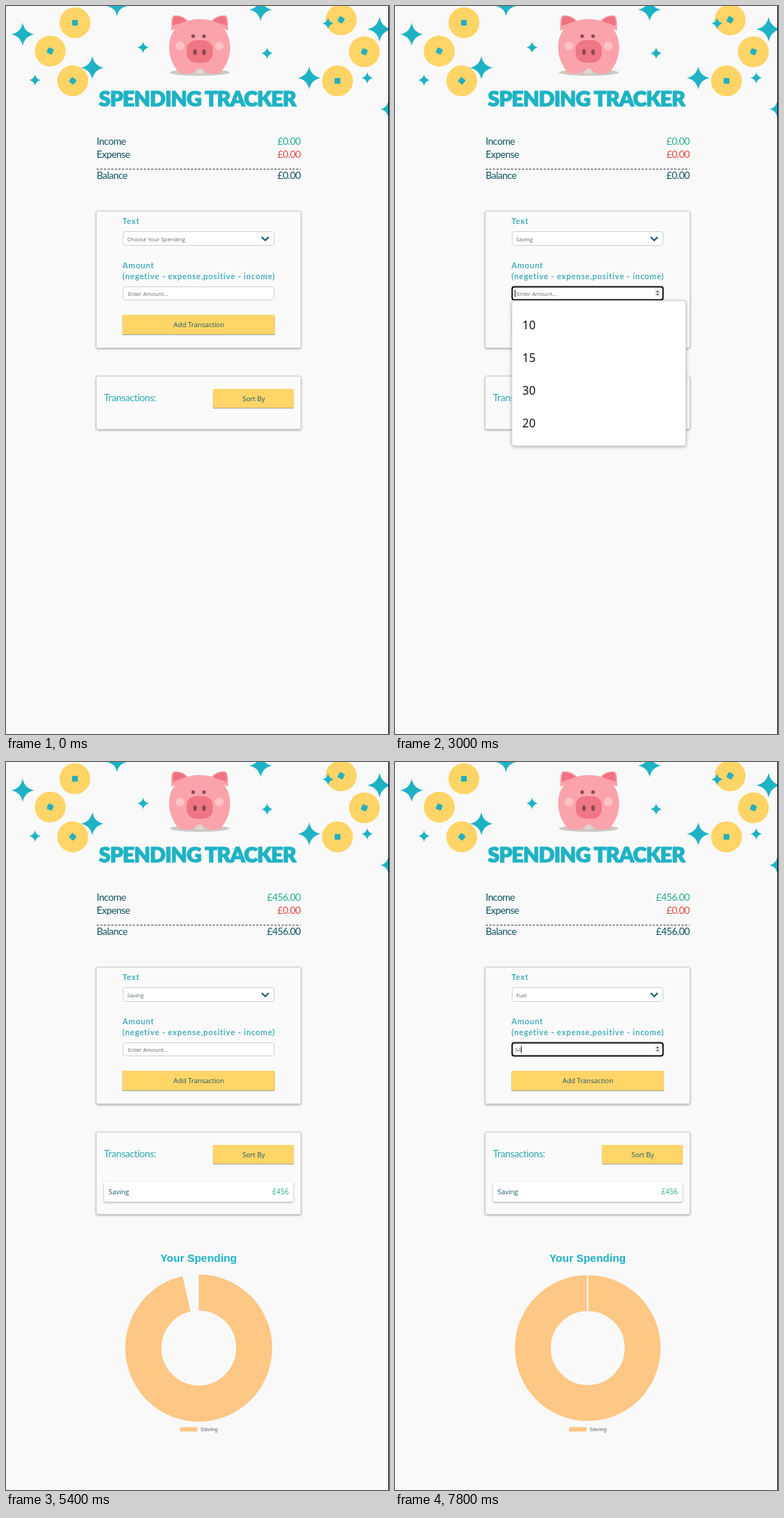
Write an HTML page that moves like this. It is 528x1002 px and loops after 8 s.

```html
<!DOCTYPE html>
<html lang="en">
<head>
<meta charset="utf-8">
<title>Spending Tracker</title>
<style>
  html, body { margin: 0; width: 100%; height: 100%; overflow: hidden; background: #f9f9f9; }
  svg { display: block; }
  text { white-space: pre; }
  .row { font: 13.5px Lato, sans-serif; letter-spacing: -.55px; fill: #0f5260; }
  .label { font: bold 11px Lato, sans-serif; letter-spacing: .7px; fill: #46adba; }
  .small { font: 7.6px "Open Sans", sans-serif; fill: #5c6b72; }
  .button { font: 9.3px "Open Sans", sans-serif; fill: #17586a; }
  .number { font: 16px "Noto Sans", sans-serif; fill: #111; }
  .end { text-anchor: end; }
  .mid { text-anchor: middle; }
  .card { fill: #fafafa; stroke: #d2d2d2; filter: drop-shadow(0 1.5px 1.5px rgba(0,0,0,.34)); }
  .gold { fill: #ffd567; filter: drop-shadow(0 1px .6px rgba(0,0,0,.35)); }
  .field { fill: #fff; stroke: #d0d0d0; }
  .popup { fill: #fff; stroke: #d0d0d0; filter: drop-shadow(0 1px 2px rgba(0,0,0,.3)); }
  .menu { fill: #fff; stroke: #5a5a5a; filter: drop-shadow(0 1px 3px rgba(0,0,0,.32)); }
</style>
</head>
<body>
<svg width="528" height="1002" viewBox="0 0 528 1002">
  <rect width="528" height="1002" fill="#f9f9f9"/>
  <g id="decor"></g>

  <g id="pig">
    <ellipse cx="267" cy="91.5" rx="41" ry="4.5" fill="#cdc8c4"/>
    <path d="M228 34Q227 13 232 13Q245 12 252 22ZM306 34Q307 13 302 13Q289 12 282 22Z" fill="#f9a0a8"/>
    <path d="M230 27Q229 14 234 14Q243 14 249 21ZM304 27Q305 14 300 14Q291 14 285 21Z" fill="#ef7481"/>
    <path d="M267 18C291 18 309 31 309 57C309 73 303 82 297 90Q295 93 289 93H281Q276 93 273 89H261Q258 93 253 93H245Q239 93 237 90C231 82 225 73 225 57C225 31 243 18 267 18Z" fill="#fba3ab"/>
    <path d="M261 93Q262 86 267 86Q272 86 273 93Z" fill="#ddd5d1"/>
    <circle cx="240" cy="55" r="6" fill="#fdc3c5"/>
    <circle cx="294" cy="55" r="6" fill="#fdc3c5"/>
    <rect x="249" y="47" width="36" height="31" rx="13" fill="#ef7783"/>
    <g fill="#8a4b4f">
      <circle cx="258" cy="41.5" r="2.5"/>
      <circle cx="273" cy="41.5" r="2.5"/>
      <ellipse cx="260.5" cy="63.5" rx="2.5" ry="4"/>
      <ellipse cx="273" cy="63.5" rx="2.5" ry="4"/>
    </g>
  </g>
  <text x="128" y="137.5" fill="#1eb2c5" stroke="#1eb2c5" stroke-width="1.1" stroke-linejoin="round"
    style="font:900 29px Lato,sans-serif;letter-spacing:-.9px">SPENDING TRACKER</text>
  <path d="M527.5 0V1002" stroke="#111"/>

  <g class="row">
    <text x="125" y="191">Income</text>
    <text x="125" y="209">Expense</text>
    <text x="125" y="238">Balance</text>
    <text id="income" class="end" x="406" y="191" style="fill:#27ae8c"></text>
    <text class="end" x="406" y="209" style="fill:#e0483f">£0.00</text>
    <text id="balance" class="end" x="406" y="238"></text>
  </g>
  <path d="M125 224.5H406" stroke="#444" stroke-dasharray="3 2"/>

  <rect class="card" x="124.5" y="282.5" width="282" height="188" rx="2"/>
  <g class="label">
    <text x="160.5" y="300">Text</text>
    <text x="160.5" y="361">Amount</text>
    <text x="160.5" y="376">(negetive - expense,positive - income)</text>
  </g>
  <rect id="select" class="field" x="161.5" y="310.5" width="208" height="19" rx="3"/>
  <text id="choice" class="small" x="167" y="324"></text>
  <path d="M352.5 318l4.8 4.6 4.8-4.6" fill="none" stroke="#0e5868" stroke-width="2"/>
  <rect id="input" x="161.5" y="386.5" width="208" height="18" rx="3" fill="#fff"/>
  <text id="amount" class="small" y="399"></text>
  <path id="caret" stroke="#111"/>
  <g id="spinner">
    <rect x="358" y="390" width="8" height="10" fill="#eee"/>
    <path d="M360 394l2-2.4 2 2.4zM360 396.200l2 2.4 2-2.4z" fill="#444"/>
  </g>
  <rect class="gold" x="160.500" y="425" width="210" height="27" rx="1"/>
  <text class="button mid" x="266" y="442">Add Transaction</text>

  <rect id="list" class="card" x="124.5" y="509.5" width="282" rx="2"/>
  <text class="row" x="135" y="543.5" style="fill:#2fa8b5;letter-spacing:-.4px">Transactions:</text>
  <rect class="gold" x="285.5" y="527" width="111" height="26" rx="1"/>
  <text class="button mid" x="341.5" y="544">Sort By</text>

  <g id="result">
    <rect x="135" y="577.5" width="261" height="28" rx="3" fill="#fff"
      style="filter:drop-shadow(0 1px 1px rgba(0,0,0,.36))"/>
    <text class="button" x="141.5" y="595">Saving</text>
    <text class="button end" x="390" y="595" style="fill:#27ae8c;font-size:10px">£456</text>
    <text class="mid" x="265.5" y="688" fill="#1eb2c5"
      style="font:bold 15px 'Liberation Sans',Arial,sans-serif">Your Spending</text>
    <circle id="ring" cx="265.7" cy="806.6" pathLength="360" fill="none" stroke="#fdc785"
      transform="rotate(-90 265.7 806.6)"/>
    <path id="seam" d="M265.5 706V756" stroke="#fff" stroke-width="1.8"/>
    <rect x="240" y="915.5" width="24" height="6" fill="#fdc785"/>
    <text x="268" y="921" fill="#666" style="font:7.85px 'Liberation Sans',Arial,sans-serif">Saving</text>
  </g>

  <g id="menu"></g>
  <g id="suggest">
    <rect id="suggestBox" class="popup" x="161" y="405.5" width="240" rx="4"/>
    <g id="suggestItems" class="number"></g>
  </g>
</svg>

<script>
const LOOP = 8000, STEP = 100;
const ADDED = 4900, CHART_START = 4834, CHART_TIME = 1000;
const OPTIONS = ['Choose Your Spending', 'Salary', 'Carry Over', 'Deposits', 'Saving', 'Eating Out',
  'Gifts', 'Clothes', 'Entertainment', 'Fuel', 'Holidays', 'Kids', 'Shopping', 'Sports', 'Travel',
  'Car', 'Health', 'House', 'Others'];
const HISTORY = ['10', '15', '30', '20'];

const el = id => document.getElementById(id);
const show = (id, on) => el(id).setAttribute('visibility', on ? 'inherit' : 'hidden');
const set = (id, attrs) => Object.entries(attrs).forEach(([k, v]) => el(id).setAttribute(k, v));
const during = (t, ...spans) => spans.some(([from, to]) => t >= from && t < to);
// Latest value whose start time has passed.
const latest = (t, keys) => keys.filter(([start]) => t >= start).pop()[1];

function drawDecor() {
  const coins = [[95, 23, 0], [61, 62, 22], [92, 103, 38], [462, 19, 30], [494, 63, 22], [457, 103, 0]];
  const stars = [[23, 39, 16], [119, 85, 16], [153, 0, 14], [189, 57, 8], [40, 102, 8], [351, 5, 16],
    [360, 65, 8], [444, 24, 8], [418, 99, 16], [498, 99, 8], [515, 32, 17], [527, 142, 11]];
  const coin = ([x, y, turn]) => `<g transform="translate(${x} ${y}) rotate(${turn})">
    <circle r="21.3" fill="#ffd467"/><rect x="-4" y="-4" width="8" height="8" rx="1.5" fill="#22b0c0"/></g>`;
  const star = ([x, y, r]) => `<path transform="translate(${x} ${y}) scale(${r})" fill="#1eb2c5"
    d="M0-1Q.16-.16 1 0Q.16.16 0 1Q-.16.16-1 0Q-.16-.16 0-1Z"/>`;
  el('decor').innerHTML = coins.map(coin).join('') + stars.map(star).join('');
}

function drawMenu() {
  el('menu').innerHTML = '<rect class="menu" x="161.5" y="327.5" width="209" height="229"/>' +
    '<rect id="highlight" x="162" width="208" height="12" fill="#1e90ff"/>' +
    OPTIONS.map((name, i) => `<text class="small option" x="167.5" y="${337 + 12 * i}">${name}</text>`).join('');
}

function renderMenu(t) {
  show('menu', during(t, [1600, 2200], [5800, 6300]));
  const active = OPTIONS.indexOf(latest(t, [[0, 'Choose Your Spending'], [1700, 'Carry Over'],
    [1800, 'Saving'], [5900, 'Gifts'], [6000, 'Fuel']]));
  set('highlight', { y: 328 + 12 * active });
  document.querySelectorAll('.option').forEach((o, i) => o.style.fill = i === active ? '#fff' : '');
}

function renderInput(t) {
  const focused = during(t, [3000, 4800], [7100, LOOP]);
  const typed = latest(t, [[0, ''], [3700, '4'], [3900, '45'], [4100, '456'], [4800, ''],
    [7600, '3'], [7800, '34']]);
  const value = t >= 4800 && t < ADDED ? '456' : typed;
  set('input', { stroke: focused ? '#101010' : '#d0d0d0', 'stroke-width': focused ? 2 : 1 });
  el('amount').textContent = value || 'Enter Amount...';
  set('amount', { x: value ? 165 : 168 });
  set('caret', { d: `M${165.5 + 4.35 * typed.length} 390.5V400.5` });
  show('caret', during(t, [3000, 3500], [3700, 4700], [7100, LOOP]));
  show('spinner', during(t, [500, 600], [2500, 2700], [2800, 4800], [6500, LOOP]));

  const matches = HISTORY.filter(h => h.startsWith(typed));
  show('suggest', focused && matches.length);
  set('suggestBox', { height: 20 + 45 * matches.length });
  el('suggestItems').innerHTML =
    matches.map((m, i) => `<text x="175.5" y="${444.5 + 45 * i}">${m}</text>`).join('');
}

function renderResult(t) {
  const added = t >= ADDED, total = added ? '£456.00' : '£0.00';
  el('income').textContent = el('balance').textContent = total;
  set('list', { height: added ? 113 : 73 });
  show('result', added);

  const p = Math.max(0, Math.min(1, (t - CHART_START) / CHART_TIME));
  const sweep = 360 * (1 - (1 - p) ** 4), done = t >= 5800;
  set('ring', {
    r: done ? 75.7 : 76.45,
    'stroke-width': done ? 49.5 : 49.7,
    'stroke-dasharray': done ? 'none' : `${sweep} 360`
  });
  show('seam', done);
}

function render(now) {
  const t = Math.floor(now % LOOP / STEP) * STEP;
  el('choice').textContent = latest(t, [[0, OPTIONS[0]], [2200, 'Saving'], [6300, 'Fuel']]);
  set('select', { stroke: during(t, [2200, 2700], [6300, 7100]) ? '#888' : '#d0d0d0' });
  renderMenu(t);
  renderInput(t);
  renderResult(t);
}

drawDecor();
drawMenu();
const start = performance.now();
(function frame() {
  render(performance.now() - start);
  requestAnimationFrame(frame);
})();
</script>
</body>
</html>
```
